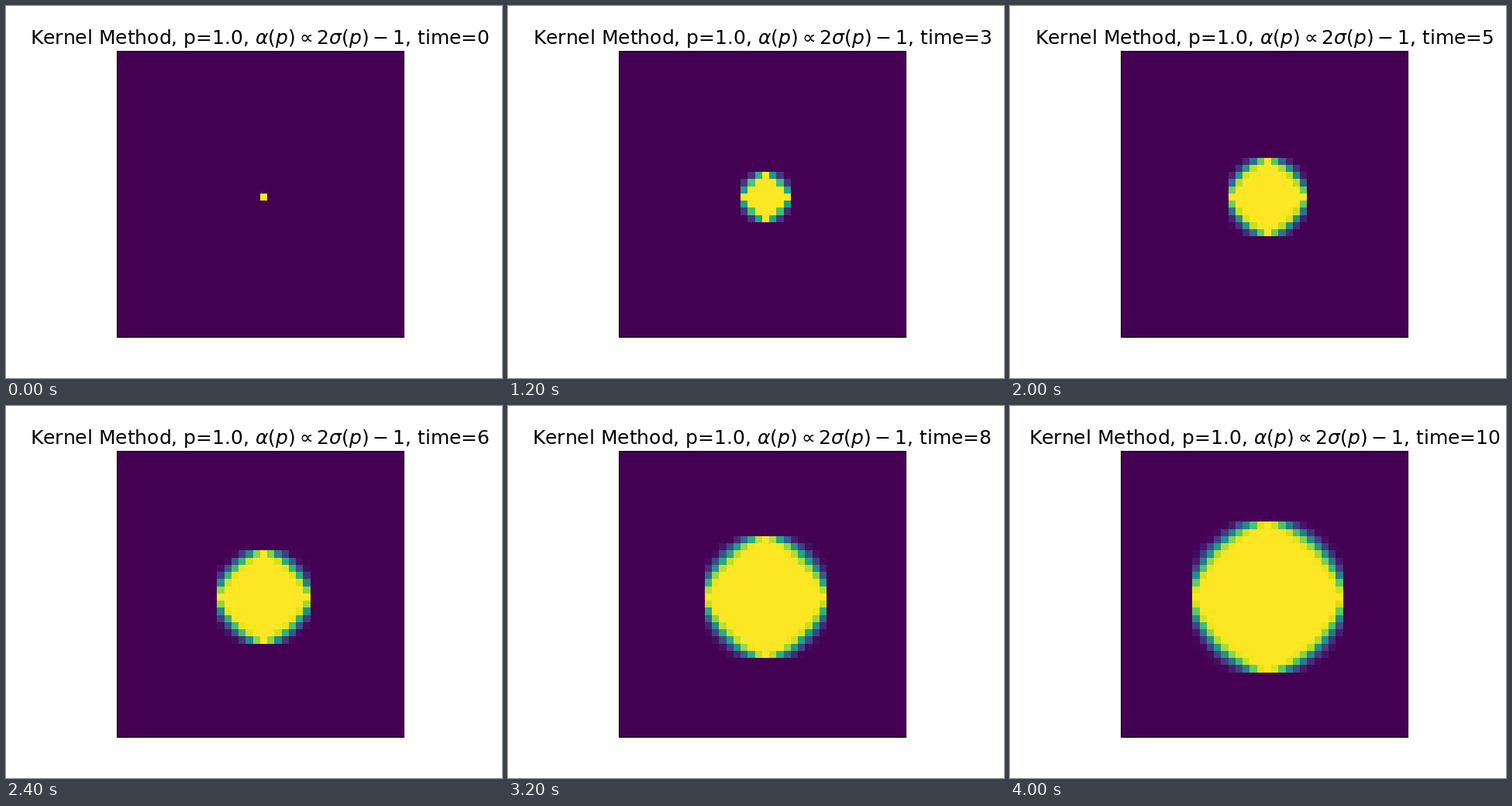
Recreate the animation shown at these times as a matplotlib script. Size 640 by 480 pixels, loop 4400 ms.

```python
import matplotlib.pyplot as plt
import numpy as np
from matplotlib.animation import FuncAnimation

SIZE = 40
STEPS = 11
RUNS = 400
DIAGONAL = 0.245  # chance of spreading to a diagonal neighbour


def shifted(cells, dy, dx):
    return np.roll(cells, (dy, dx), axis=(1, 2))


def spread(cells, rng):
    """Advance every run by one step: straight always, diagonal by chance."""
    grown = cells.copy()
    for dy in (-1, 0, 1):
        for dx in (-1, 0, 1):
            reached = shifted(cells, dy, dx)
            if dy and dx:
                reached = reached & (rng.random(cells.shape) < DIAGONAL)
            grown |= reached
    return grown


def simulate():
    rng = np.random.default_rng(7)
    cells = np.zeros((RUNS, SIZE, SIZE), dtype=bool)
    cells[:, SIZE // 2, SIZE // 2] = True
    means = []
    for _ in range(STEPS):
        means.append(cells.mean(axis=0))
        cells = spread(cells, rng)
    return means


states = simulate()

fig, ax = plt.subplots(figsize=(6.4, 4.8), dpi=100)
ax.set_xticks([])
ax.set_yticks([])
image = ax.imshow(states[0], cmap="viridis", vmin=0, vmax=1,
                  interpolation="nearest")
title = ax.set_title("", fontsize=18, fontfamily="DejaVu Sans")


def update(step):
    image.set_data(states[step])
    title.set_text(r"Kernel Method, p=1.0, $\alpha(p) \propto 2\sigma(p)-1$, "
                   f"time={step}")
    return image, title


anim = FuncAnimation(fig, update, frames=STEPS, interval=400, repeat=True)
plt.show()
```
